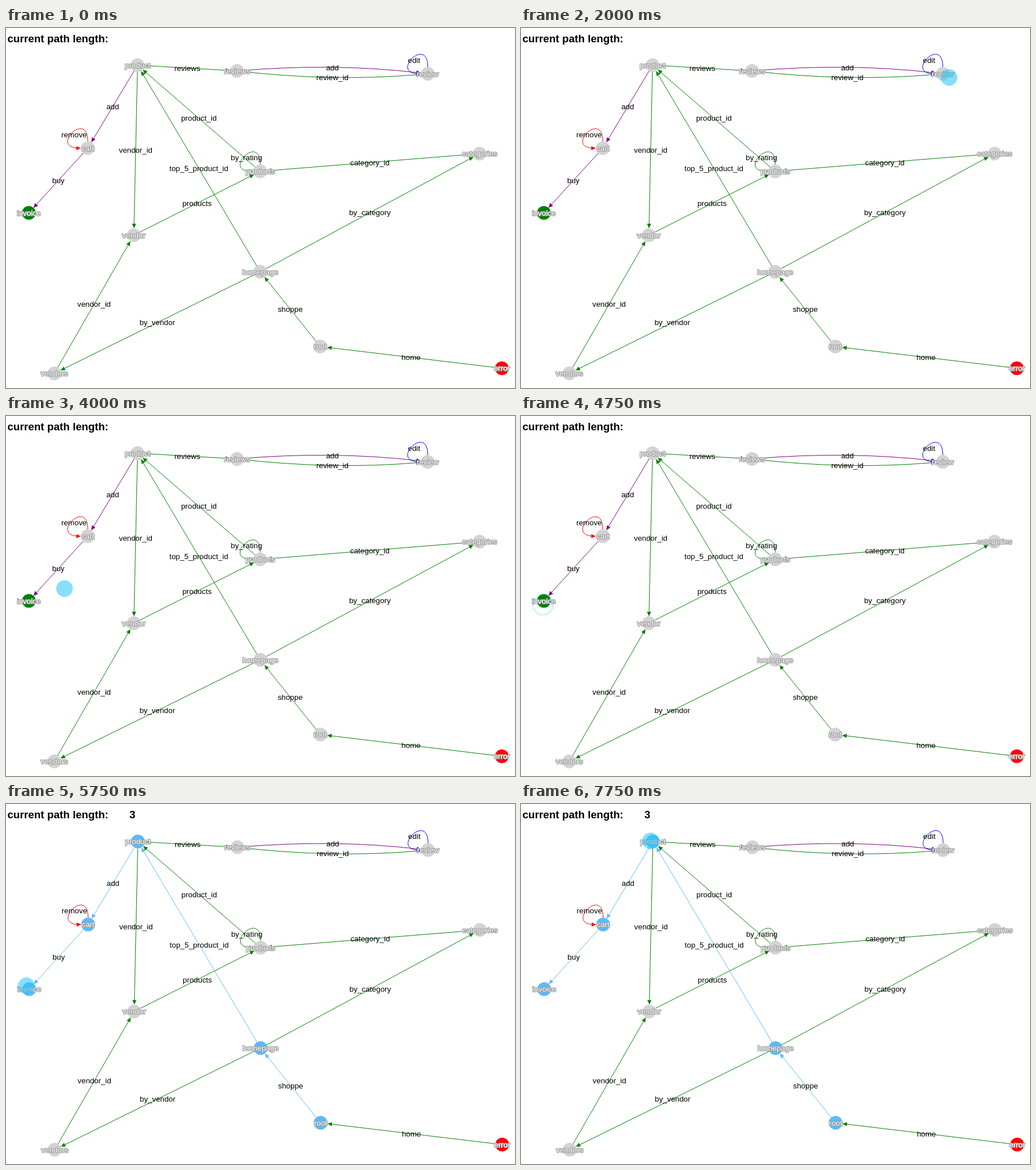
An HTML page for the animation above (8000 ms loop, 890 by 629 pixels).

```html
<!DOCTYPE html>
<html lang="en">
<head>
<meta charset="utf-8">
<title>Path graph</title>
<style>
  html, body { margin: 0; width: 100%; height: 100%; overflow: hidden; background: #fff; }
  svg { display: block; width: 890px; height: 629px; }
  text { font-family: "Liberation Sans", Arial, sans-serif; font-size: 13.333px; }
  .title { font-size: 18.72px; font-weight: bold; }
  .label, .name { text-anchor: middle; }
  .name { fill: #fff; stroke: #999; stroke-width: 2.2px; stroke-linejoin: round; paint-order: stroke; }
  .line { fill: none; stroke-width: 1px; }
</style>
</head>
<body>
<svg id="stage" viewBox="0 0 890 629">
  <text class="title" x="2.4" y="25">current path length:</text>
  <text class="title" id="count" x="215.8" y="25">3</text>
  <g id="graph"></g>
  <circle id="ring" fill="none" stroke="#24c4fa" stroke-width="3"/>
  <circle id="pointer" r="14.5" fill="#24c4fa" fill-opacity=".55"/>
</svg>
<script>
const LOOP = 8000, STEP = 250, RADIUS = 12, SHIFT = 0.6;
const GREY = [211, 211, 211], GREEN = [0, 128, 0], PURPLE = [128, 0, 128],
      RED = [255, 0, 0], BLUE = [0, 0, 255], ACTIVE = [93, 185, 251];

const nodes = {
  product: [230, 65], reviews: [404, 75], review: [737.5, 80], cart: [143, 210],
  invoice: [40, 323], categories: [828, 219.5], products: [444.5, 250.5],
  vendor: [223.5, 362], homepage: [444.5, 426], vendors: [84.5, 603.5],
  root: [549.5, 556.5], error: [867, 594.5]
};
const nodeColors = { invoice: GREEN, error: RED };
const path = ['root', 'homepage', 'product', 'cart', 'invoice'];

// from, to, label, colour, bend
const edges = [
  ['product', 'reviews', 'reviews', GREEN],
  ['reviews', 'review', 'add', PURPLE, -17],
  ['reviews', 'review', 'review_id', GREEN, 17],
  ['review', 'review', 'edit', BLUE],
  ['product', 'cart', 'add', PURPLE],
  ['cart', 'cart', 'remove', RED],
  ['cart', 'invoice', 'buy', PURPLE],
  ['product', 'vendor', 'vendor_id', GREEN],
  ['products', 'product', 'product_id', GREEN],
  ['products', 'products', 'by_rating', GREEN],
  ['categories', 'products', 'category_id', GREEN],
  ['vendor', 'products', 'products', GREEN],
  ['homepage', 'product', 'top_5_product_id', GREEN],
  ['homepage', 'categories', 'by_category', GREEN],
  ['homepage', 'vendors', 'by_vendor', GREEN],
  ['vendors', 'vendor', 'vendor_id', GREEN],
  ['root', 'homepage', 'shoppe', GREEN],
  ['error', 'root', 'home', GREEN]
];

// time, x, y; without a place the pointer is hidden
const moves = [
  [0], [1250, 896.5, 69.5], [1500, 788.5, 88.5], [2000, 748.5, 86.5],
  [2250, 631.5, 121.5], [2500, 604.5, 139.5], [2750, 605.2, 139], [3000, 544.5, 145.5],
  [3250, 374.5, 163.5], [3750, 101.5, 291.5], [4000, 102.3, 301.5], [4250, 39.5, 312.5],
  [4500], [5750, 35.5, 317.5], [7000, 82.5, 285], [7250, 235.5, 142.5],
  [7500, 233.5, 89.5], [7750, 226.5, 64.5]
];
// time, x, y, radius, opacity
const rings = [
  [0], [4500, 38.5, 330, 17, .45], [4750, 38.5, 329.7, 17.5, .22],
  [5000, 34.5, 331, 17, .45], [5250, 34.5, 331, 17.5, .27], [5500, 34.5, 331, 18.8, .1], [5750]
];

const byId = id => document.getElementById(id);
const graph = byId('graph');
const lit = [];

function add(tag, attrs, text) {
  const el = document.createElementNS('http://www.w3.org/2000/svg', tag);
  set(el, attrs);
  if (text) el.textContent = text;
  return graph.appendChild(el);
}
function set(el, attrs) {
  for (const k in attrs) el.setAttribute(k, attrs[k]);
}
const rgb = c => `rgb(${c.map(Math.round)})`;
const mix = (a, b, k) => a.map((v, i) => v + (b[i] - v) * k);

function drawHead(x, y, angle, fill) {
  return add('path', {
    d: 'M0 0L-8 -3.6V3.6Z', fill,
    transform: `translate(${x} ${y}) rotate(${angle * 180 / Math.PI})`
  });
}

function drawEdge([from, to, label, color, bend = 0]) {
  const [x1, y1] = nodes[from], [x2, y2] = nodes[to];
  const stroke = rgb(color);
  let d, tipX, tipY, angle, textX, textY;
  if (from === to) {
    d = `M${x1} ${y1 - RADIUS}c0 -56 -56 ${RADIUS} ${-RADIUS - 3} ${RADIUS}`;
    d = `M${x1} ${y1 - RADIUS}C${x1} ${y1 - 68} ${x1 - 68} ${y1} ${x1 - RADIUS - 3} ${y1}`;
    [tipX, tipY, angle] = [x1 - RADIUS, y1, 0];
    [textX, textY] = [x1 - 24, y1 - 24];
  } else {
    const mx = (x1 + x2) / 2, my = (y1 + y2) / 2;
    angle = Math.atan2(y2 - my - bend, x2 - mx);
    tipX = x2 - RADIUS * Math.cos(angle);
    tipY = y2 - RADIUS * Math.sin(angle);
    const endX = tipX - 3 * Math.cos(angle), endY = tipY - 3 * Math.sin(angle);
    d = `M${x1} ${y1}Q${mx} ${my + bend} ${endX} ${endY}`;
    [textX, textY] = [mx, my + bend / 2];
  }
  const line = add('path', { class: 'line', d, stroke });
  const head = drawHead(tipX, tipY, angle, stroke);
  const i = path.indexOf(from);
  if (i >= 0 && path[i + 1] === to) {
    lit.push([line, 'stroke', color], [head, 'fill', color]);
  }
  return () => add('text', { class: 'label', x: textX, y: textY + 4.7 }, label);
}

edges.map(drawEdge).forEach(drawLabel => drawLabel());

for (const name in nodes) {
  const [cx, cy] = nodes[name], color = nodeColors[name] || GREY;
  const dot = add('circle', { cx, cy, r: RADIUS, fill: rgb(color) });
  if (path.includes(name)) lit.push([dot, 'fill', color]);
}
for (const name in nodes) {
  const [x, y] = nodes[name];
  add('text', { class: 'name', x, y: y + 4.7 }, name);
}

const at = (table, t) => table.filter(row => row[0] <= t).pop();
const easeCubic = k => k < .5 ? 4 * k ** 3 : 1 - 4 * (1 - k) ** 3;

function render(t) {
  const [, px, py] = at(moves, t);
  set(byId('pointer'), { cx: px || 0, cy: py || 0, visibility: px ? 'visible' : 'hidden' });

  const [, cx = 0, cy = 0, r = 0, opacity = 0] = at(rings, t);
  set(byId('ring'), { cx, cy, r, opacity });

  set(byId('count'), { visibility: t >= 5250 ? 'visible' : 'hidden' });
  const shift = t >= 5000 ? SHIFT : 0;
  set(graph, { transform: `translate(${shift} ${shift})` });

  const k = easeCubic(Math.min(1, Math.max(0, (t - 5000) / 750)));
  for (const [el, attr, color] of lit) el.setAttribute(attr, rgb(mix(color, ACTIVE, k)));
}

const start = performance.now();
let shown = -1;
function tick() {
  const t = Math.floor((performance.now() - start) % LOOP / STEP) * STEP;
  if (t !== shown) render(shown = t);
  requestAnimationFrame(tick);
}
tick();
</script>
</body>
</html>
```
